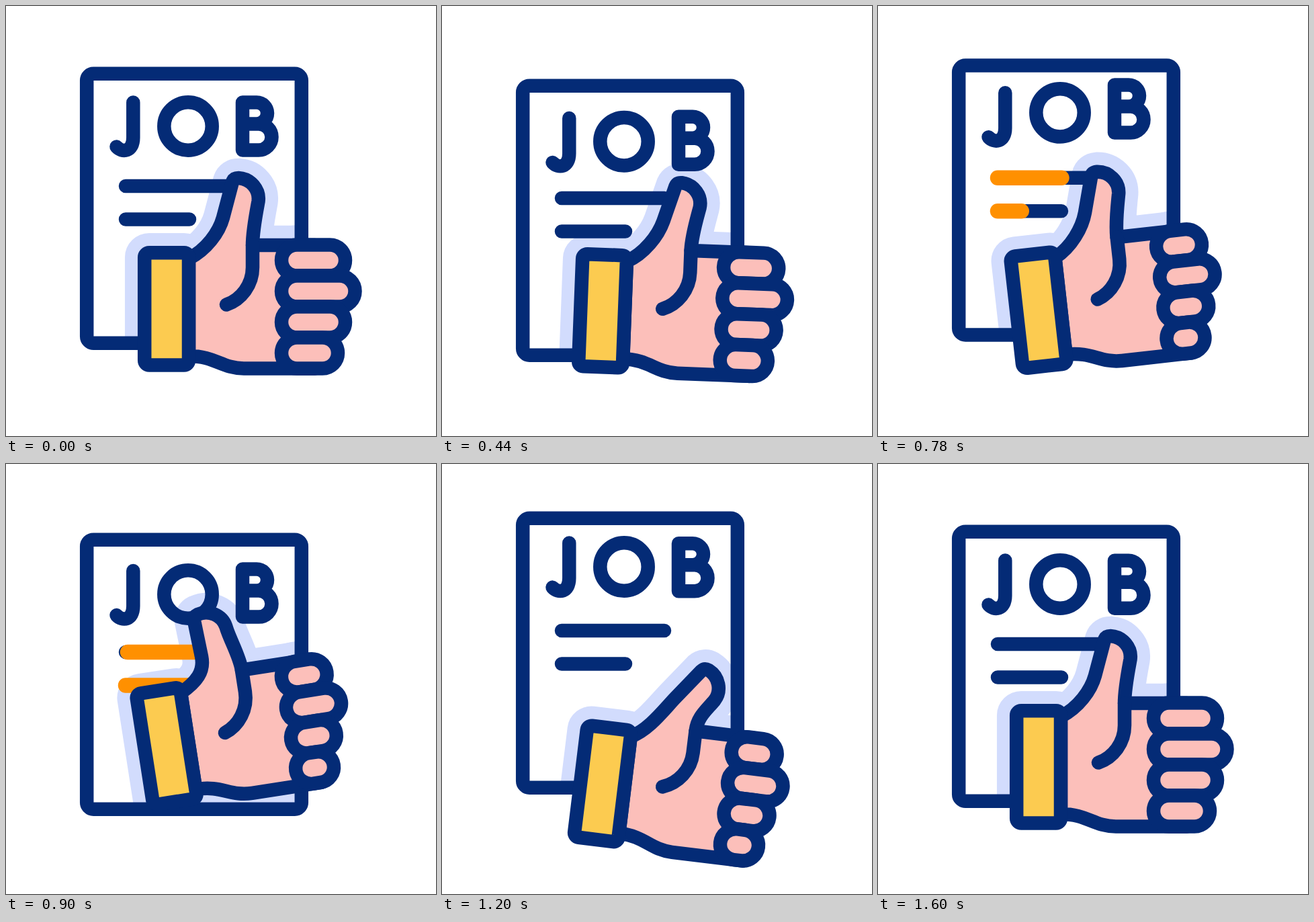
Recreate the animation shown at these times as an HTML page. Size 640 by 640 pixels, loop 1960 ms.

```html
<!DOCTYPE html>
<html lang="en">
<head>
<meta charset="utf-8">
<title>Job approved</title>
<style>
  html, body { margin: 0; width: 100%; height: 100%; overflow: hidden; background: #fff; }
  svg {
    display: block; width: 100%; height: 100%;
    fill: none; stroke: #042b76; stroke-width: 20.5;
    stroke-linecap: round; stroke-linejoin: round;
  }
  #body, .finger { fill: var(--skin); }
  #cuff { fill: var(--cuff); }
  .hand { --skin: #fcbfba; --cuff: #fccb50; }
  .halo { --skin: #d2dcfd; --cuff: #d2dcfd; stroke: #d2dcfd; stroke-width: 58.5; }
  .mark { stroke: #ff9000; stroke-width: 22.5; }
</style>
</head>
<body>
<svg viewBox="0 0 640 640" role="img" aria-label="JOB">
  <defs>
    <clipPath id="page"><rect class="paper" x="120" y="100" width="320" height="402"/></clipPath>
    <g id="shape">
      <path id="body"/>
      <path d="M367 356V389C367 415 350 437 328 444.5"/>
      <rect class="finger"/><rect class="finger"/><rect class="finger"/><rect class="finger"/>
      <rect id="cuff" x="206.2" y="367.2" width="65.8" height="167.3" rx="7"/>
    </g>
  </defs>
  <g clip-path="url(#page)"><use class="halo pose" href="#shape"/></g>
  <rect class="paper" x="120.2" y="100.7" width="319.6" height="401" rx="10"/>
  <path class="letter" d="M189.3 143.5V196C189.3 217 173 219 164.5 209.5"/>
  <circle class="letter" cx="271" cy="179" r="35.7"/>
  <path class="letter" d="M352 143.5H373A16 16 0 0 1 373 175.5H352H376A19.5 19.5 0 0 1 376 214.5H352Z"/>
  <g class="paper">
    <path d="M178 268H331M178 317.5H273"/>
    <path class="mark"/><path class="mark"/>
  </g>
  <use class="hand pose" href="#shape"/>
</svg>
<script>
const LOOP = 1960, STEP = 20;
const all = s => [...document.querySelectorAll(s)];
const papers = all('.paper'), letters = all('.letter'), poses = all('.pose');
const marks = all('.mark'), fingers = all('.finger'), body = document.getElementById('body');

const smooth = u => {
  u = Math.min(1, Math.max(0, u));
  return u * u * (3 - 2 * u);
};
const ramp = (t, from, length) => smooth((t - from) / length);

// Eases from one level to the next, reaching each on its beat.
const swing = (t, beats, levels) => levels.reduce((sum, level, i) =>
  i ? sum + (level - levels[i - 1]) * ramp(t, beats[i - 1], beats[i] - beats[i - 1]) : level, 0);

// Both motions are a dip, a high swing and a fading echo.
const sheetWave = t => swing(t, [280, 440, 640, 900, 935, 1190, 1460, 1590], [0, 0.45, -1, 0.3, 0.3, -0.5, 0.05, 0]);
const handWave = (t, beats) => swing(t, beats, [0, 1, -0.85, -0.85, 0.67, 0]);

const shift = (el, y) => el.setAttribute('transform', `translate(0 ${y})`);

// Hand outline; the thumb tip turns and slides while its root stays put.
function outline(bend) {
  const a = bend * Math.PI / 180, c = Math.cos(a), s = Math.sin(a);
  const cx = 346 + bend * (1.05 - 0.011 * bend);
  const cy = 286 + bend * (0.016 * bend - 0.1);
  const tip = (x, y) => `${cx + x * c - y * s} ${cy + x * s + y * c}`;
  return `M272 376C298 363 ${tip(-29, 51)} ${tip(-23, 29)}L${tip(-9, -24)}`
    + `Q${tip(-7, -30)} ${tip(0, -30)}C${tip(18, -29)} ${tip(32, -13)} ${tip(29.5, 5)}`
    + `C${tip(26, 24)} 367 335 367 356H460V539.5H354C320 539 312 521 272 521Z`;
}

function drawFist(clench) {
  const inset = 13.5 * clench;
  [95, 109.5, 95, 84].forEach((reach, i) => {
    const box = { x: 410 + inset, y: 355.5 + 46 * i, width: reach - 2 * inset, height: 46, rx: 23 };
    for (const key in box) fingers[i].setAttribute(key, box[key]);
  });
}

function drawMark(el, i, t) {
  const x = 178, y = 268 + 49.5 * i, length = 153 - 58 * i, from = 640 + 40 * i;
  const head = ramp(t, from, 240), tail = ramp(t, from + 240, 240);
  el.setAttribute('d', head > tail ? `M${x + length * tail} ${y}H${x + length * head}` : '');
}

function draw(now) {
  const t = Math.floor(now % LOOP / STEP) * STEP;
  papers.forEach(el => shift(el, 40 * sheetWave(t - 4)));
  letters.forEach((el, i) => shift(el, 52 * sheetWave(t - 15 * i)));
  marks.forEach((el, i) => drawMark(el, i, t));

  const lift = handWave(t, [400, 635, 920, 985, 1205, 1600]);
  const turn = handWave(t, [370, 605, 830, 930, 1200, 1600]);
  body.setAttribute('d', outline(lift * (28 + 8 * lift)));
  drawFist(ramp(t, 285, 320) - ramp(t, 1190, 280));
  const pose = `translate(0 ${37.5 * lift}) rotate(${10.4 * turn} 239 451)`;
  poses.forEach(el => el.setAttribute('transform', pose));
}

const start = performance.now();
function tick() {
  draw(performance.now() - start);
  requestAnimationFrame(tick);
}
tick();
</script>
</body>
</html>
```
